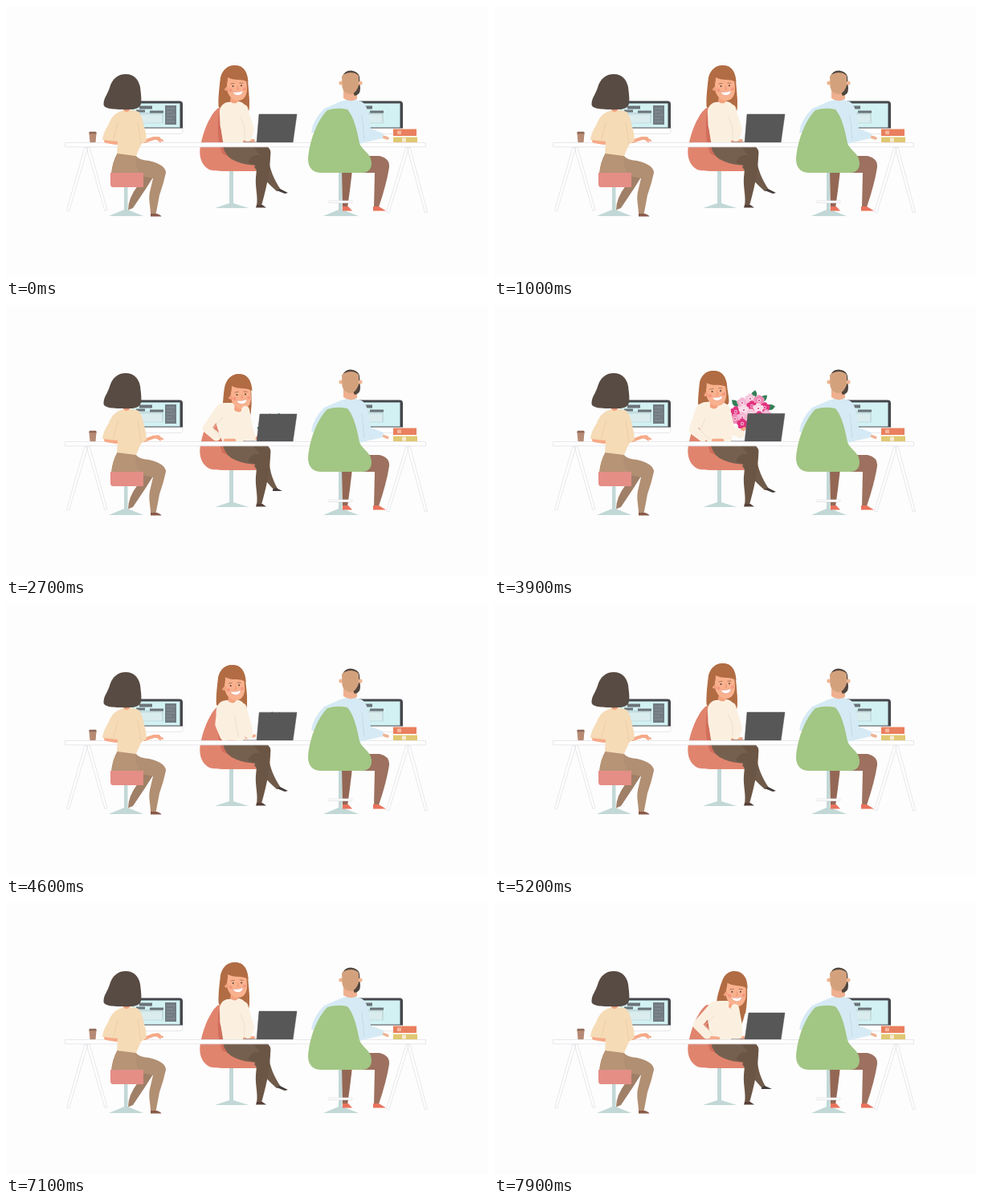
Write an HTML page that moves like this. It is 600x338 px and loops after 8000 ms.

```html
<!DOCTYPE html>
<html lang="en">
<head>
<meta charset="utf-8">
<title>Office desk</title>
<style>
html, body { margin: 0; width: 100%; height: 100%; overflow: hidden; background: #fdfdfd; }
svg { display: block; width: 100vw; height: 100vh; }
.limb { fill: none; stroke-linecap: round; stroke-linejoin: round; }
.cream { stroke: #fbf0e0; }
.skin { stroke: #f6a988; }
.steel { fill: #c2d8d7; }
.white { fill: #fff; stroke: #e3e3e8; stroke-width: .8; }
</style>
</head>
<body>
<svg viewBox="0 0 600 338">
  <defs>
    <g id="screen">
      <path class="white" d="M0 32H63V38Q63 41 59 41H0Z"/>
      <path fill="#45474c" d="M0 0H59Q63 0 63 4V34H0Z"/>
      <path fill="#d2f1f2" d="M0 3H59.500V33H0Z"/>
      <path fill="#c3dcdf" d="M8 14H39V28H8Z"/>
      <path fill="#dbecee" d="M10 17H37V27H10Z"/>
      <path fill="#6b7278" d="M9 6H25V10H9ZM22 12H39V15H22ZM5 11H16V14H5Z"/>
    </g>
    <g id="bloom">
      <circle cx="0" cy="-3.600" r="3.200"/>
      <circle cx="3.400" cy="-1.100" r="3.200"/><circle cx="-3.400" cy="-1.100" r="3.200"/>
      <circle cx="2.100" cy="2.900" r="3.200"/><circle cx="-2.100" cy="2.900" r="3.200"/>
      <circle r="2.200" fill="#fff" opacity=".6"/>
      <circle r="1.100" fill="#cf3c80"/>
    </g>
    <clipPath id="aboveDesk"><path d="M240 60H420V171H240Z"/></clipPath>
  </defs>

  <!-- monitors -->
  <use href="#screen" x="157" y="118.500"/>
  <path fill="#727b82" d="M198 124H212V148H198Z"/>
  <path stroke="#929da4" stroke-width=".7" d="M200 128H210M200 132H208M200 136H210M200 140H207M200 144H210"/>
  <use href="#screen" x="431" y="118.500"/>

  <!-- middle chair -->
  <path class="steel" d="M278 205H283V246L302 252H260L278 246Z"/>
  <path fill="#e1846e" d="M265 127C257 131 247 151 243 170C239 185 242 198 253 204C258 206 264 206 270 206H313Q318 205 314 198L285 188L275 128Z"/>
  <path fill="#d06f5c" d="M266 130C262 147 263 169 269 184L282 190L276 130Z"/>

  <g clip-path="url(#aboveDesk)"><g id="bouquet"></g></g>
  <path id="hair" fill="#b16c43"/>

  <!-- crossed legs -->
  <path id="farLeg" fill="#705b4a"/>
  <path id="farShoe" fill="#453c3a"/>
  <path fill="#75604f" d="M270 175H324Q331 178 329 187L312 199Q296 198 287 194Q273 189 270 175Z"/>
  <path fill="#6b5544" d="M307 175H325Q330 178 329 190C328 211 323 231 318 249H312C314 238 310 226 311 214Q312 206 312 199Q306 197 301 195Q306 184 316 186Q310 178 307 175Z"/>
  <path fill="#574039" d="M312 248H319L324 251.500H311Z"/>

  <path id="torso" fill="#fbf0e0"/>
  <path id="lock" fill="#b16c43"/>
  <g id="head">
    <path fill="#f3a27f" d="M280 111H289V119Q285 124 279 119Z"/>
    <path fill="#f9b18e" d="M275 87Q287 84 299 90L300 103C300 113 295 118 289 118C281 118 275 110 275 102Z"/>
    <circle cx="274.500" cy="103" r="2.600" fill="#f3a27f"/>
    <path fill="#b16c43" d="M270 103C267 85 273 74 285 74C296 74 301 83 301.500 95Q296 92 290 92Q281 92 276 89Q276 97 273 103Z"/>
    <g fill="#f28a79" opacity=".65"><circle cx="279.500" cy="105" r="2.200"/><circle cx="297" cy="103.500" r="2"/></g>
    <g fill="#51413c"><circle cx="282.500" cy="100" r="1"/><circle cx="293" cy="99.300" r="1"/></g>
    <path class="limb" stroke="#9d6545" stroke-width=".8" d="M280 97L284 96.300M291 96L295 96.200"/>
    <path class="limb" stroke="#e78c6d" stroke-width=".8" d="M288.500 100L289.500 104H287.500"/>
    <path fill="#fff" stroke="#d98170" stroke-width=".4" d="M282 107Q289 108.500 295 105.500Q294.500 111 289 111.500Q284 111.500 282 107Z"/>
  </g>
  <path id="rightHand" class="limb skin" stroke-width="4"/>
  <path id="rightArm" class="limb cream" stroke-width="10"/>
  <path id="leftHand" class="limb skin" stroke-width="4.500"/>
  <path id="leftArm" class="limb cream" stroke-width="11"/>
  <path id="fold" class="limb" stroke="#e6d8c6" stroke-width=".7"/>

  <path fill="#77777b" d="M295 169.500H357V171H295Z"/>
  <path id="laptop" fill="#575758" stroke="#4a4a4b" stroke-width=".5"/>

  <!-- cup and books -->
  <path fill="#b78a74" d="M103.500 159H112.500L111.500 170.500H104.500Z"/>
  <path fill="#8f6a59" d="M104 156.800H112L113 159.300H103Z"/>
  <path fill="#e97f5e" d="M482 153.500H511V162H482Z"/>
  <path fill="#f3b79d" d="M487 155.500H492V160H487Z"/>
  <path fill="#fff" d="M481 162H512V163.500H481Z"/>
  <path fill="#e0c872" d="M482 163.500H512V170.500H482Z"/>
  <path fill="#f5ead0" d="M493 164.500H498V169.500H493Z"/>

  <!-- desk -->
  <g class="white">
    <path d="M98 176L75.500 255L78.500 256L102 176ZM100 176L123 255.500L126 254.500L104 176Z"/>
    <path d="M498 176L473.500 257L476.500 258L502 176ZM499 176L521.500 258L524.500 257L503 176Z"/>
    <path d="M73.500 170.500H522.500V175.800H73.500Z"/>
  </g>

  <!-- woman on the left -->
  <path class="steel" d="M147 225H151.500V254L171 262H128L147 254Z"/>
  <path fill="#a07f67" d="M168 209H186L174 228L158 252L152 254.500Q152 240 164 224Z"/>
  <path fill="#b18f72" d="M139 183L162 187Q165 192 178 193Q199 198 199 208Q196 222 191 236L186.500 260H180C180 250 177 242 179 232L183 215Q174 212 165 213L131 211Q132 195 139 183Z"/>
  <path fill="#b69475" d="M139 183L162 187Q159 202 170 211H131Q132 195 139 183Z"/>
  <path fill="#8a5948" d="M180 259H187Q192 260 193.500 262.500H180Z"/>
  <path fill="#e48e86" d="M130 208H171V226H133Q130 226 130 222Z"/>
  <g id="typistHand">
    <path class="limb skin" stroke-width="4" d="M172 169L184 165L190 165"/>
    <path class="limb skin" stroke-width="2.200" d="M188 164L195 168M187 165L192 169"/>
  </g>
  <path class="limb skin" stroke-width="6" d="M125 168L137 170"/>
  <path fill="#f5dbb6" d="M141 132C148 129 159 129 165 132C170 137 171 148 174 158L175 168L168 173L162 187L138 184L139 169L120 167Q121 158 127 149Q132 135 141 132Z"/>
  <path class="limb" stroke="#e7c9a2" stroke-width=".7" d="M139 146L134 166M164 145L168 171"/>
  <path fill="#f2a17f" d="M146 125H154V130Q150 134 146 130Z"/>
  <path fill="#574b43" d="M149 85C160 85 165 92 167 101C168 110 169 116 168 122C166 129.500 156 129.500 145 129C132 129 121 128 121.500 122C122 114 126 111 129 102C132 91 139 85 149 85Z"/>

  <!-- man on the right -->
  <path class="steel" d="M414 206H418.500V254L439 262H395L414 254Z"/>
  <path fill="#946755" d="M418 205H431L428 230L425 252H419Z"/>
  <path fill="#9d705f" d="M443 187H465Q478 190 477 201Q474 221 464 251H458L459 208H444Z"/>
  <path fill="#e9725c" d="M419 250H426L431 255.500H419ZM457 250H464L473 255.500H457Z"/>
  <path class="white" d="M402 243H431V245.500H402Z"/>
  <g id="manHand">
    <path class="limb" stroke="#f0b292" stroke-width="3.500" d="M469 163L475 165"/>
  </g>
  <path fill="#d5eaf4" d="M412 121Q428 113 442 119C450 122 452 137 454 153L470 159L469 165L452 169L440 172L392 159L380 158Q382 142 396 128Z"/>
  <path class="limb" stroke="#b9d4e0" stroke-width=".7" d="M443 136L446 166"/>
  <path fill="#a2c684" d="M400 130Q412 126 425 129C433 138 437 155 440 171C444 181 455 184 455 196Q455 207 444 208H391Q377 207 376 192C377 170 387 143 400 130Z"/>
  <path fill="#efb08f" d="M420 102H437V116Q428 121 420 115Z"/>
  <path fill="#51463f" d="M419 88Q421 80.500 429 80.500Q438 81 440 88L441 103Q441 111 434 112Q431 109 434 100V86H419Z"/>
  <g fill="#efb693"><circle cx="417" cy="96" r="2.600"/><circle cx="441" cy="96" r="2.600"/></g>
  <path fill="#d3a27d" d="M418 87.500Q422 83 430 83Q437 83.500 439 87.500L439 99Q436 109 429 110Q420 109 418.500 101Z"/>
</svg>
<script>
const LOOP = 8000, CYCLE = 6000;
const el = id => document.getElementById(id);

const upright = {
  head: 'translate(0 0) rotate(0 285 98)',
  hair: 'M285 74C296 74 300 83 301 93C302 106 304 119 302 131L290 134L270 128C267 128 265 127 264.500 125C264 112 266 98 267 89C270 78 277 74 285 74Z',
  lock: 'M298 95C302 106 304 121 302 132C299 134 298 130 298 123Z',
  torso: 'M276 120C269 121 265 127 266 136C267 150 269 164 271 174L301 174C303 160 303 140 299 126C296 120 290 118 285 119Z',
  leftArm: 'M272 130L272 148L276 165',
  leftHand: 'M277 173L286 173',
  rightArm: 'M296 128L304 155L301 164',
  rightHand: 'M297 169L308 168',
  fold: 'M292 138L297 152L297 165',
  farLeg: 'M314 192L327 190C328 204 334 217 342 229L337 231C329 224 316 211 309 201Z',
  farShoe: 'M337 230L341 228L351 233L347 234Z',
  laptop: 'M315 135L362 135L357 171L312 171Z',
  bouquet: 'translate(337 157) rotate(-25) scale(.5)'
};
const lean = {
  head: 'translate(14 11) rotate(3 285 98)',
  hair: 'M299 86C310 86 314 95 315 104C315.500 116 315 127 313 138L302 138L286 126C281 127 278 126 277 124C278 114 281 106 284 97C287 89 292 86 299 86Z',
  lock: 'M311 104C316 112 315 138 307 154C302 154 303 138 305 120Z',
  torso: 'M281 122C272 122 266 127 265 134C266 150 269 164 271 174L303 174C309 165 306 140 303 128C300 123 292 122 289 122Z',
  leftArm: 'M274 128L253 152L265 164',
  leftHand: 'M268 168L279 169',
  rightArm: 'M300 131L304 153L304 165',
  rightHand: 'M304 168L311 168',
  fold: 'M275 140L263 152L272 164',
  farLeg: 'M314 192L328 188C327 204 331 216 338 229L333 230C327 223 316 211 309 201Z',
  farShoe: 'M333 230L337 228L346 232L333 232Z',
  laptop: 'M317 137L362 137L357 171L312 171Z',
  bouquet: 'translate(337 157) rotate(-25) scale(.5)'
};
const reach = {
  ...upright,
  head: 'translate(5 12) rotate(0 285 98)',
  hair: 'M290 86C301 86 304 95 305 105C306 115 306 126 304 138L295 138L276 126C272 126 270 124 270 122C271 112 271 106 273 99C276 91 282 86 290 86Z',
  lock: 'M302 107C306 114 306 128 304 138C300 139 299 132 300 124Z',
  torso: 'M272 122C265 122 260 129 259 138C262 150 266 164 271 174L299 174C302 165 303 140 300 128C296 122 288 121 283 122Z',
  leftArm: 'M267 129L250 154L262 164',
  leftHand: 'M273 169L284 169',
  rightArm: 'M298 131L303 156L306 165',
  rightHand: 'M306 166L313 166',
  fold: 'M270 140L258 154L268 166',
  farLeg: lean.farLeg,
  farShoe: 'M332 230L336 228L344 232L332 232Z',
  laptop: 'M316 136L362 136L357 171L312 171Z',
  bouquet: 'translate(332 154) rotate(-25) scale(.75)'
};
const hold = {
  ...upright,
  head: 'translate(-11 8) rotate(-2 285 98)',
  hair: 'M273 82C285 82 289 91 290 101C291 109 293 116 292 123L280 132L259 128C256 128 254 127 254 125C254 114 255 106 256 96C259 86 265 82 273 82Z',
  lock: 'M287 103C291 110 293 116 292 123C289 125 287 122 286 117Z',
  torso: 'M264 121C256 121 250 128 249 138C253 152 262 164 268 174L296 174C297 160 297 140 293 128C289 121 281 119 274 120Z',
  leftArm: 'M257 129L248 156L260 165',
  leftHand: 'M273 169L284 169',
  rightArm: 'M289 130L295 156L307 161',
  rightHand: 'M306 158L312 154',
  fold: 'M263 141L257 156L268 167',
  laptop: 'M316 135.5L362 135.5L357 171L312 171Z',
  bouquet: 'translate(319 131) rotate(0) scale(1)'
};

const steps = [
  [0, upright], [1050, upright], [1900, lean], [2300, lean],
  [2700, reach], [3300, hold], [4100, hold], [4850, upright], [CYCLE, upright]
];

// x, y, colour
const blooms = [
  [-10, -9, '#f5b6d3'], [0, -14, '#f7c9dd'], [11, -12, '#f18ab6'], [18, -3, '#e2337f'],
  [-18, 2, '#e2337f'], [2, -5, '#e2337f'], [10, -2, '#f9dce8'], [-8, 0, '#f9dce8'],
  [20, 6, '#f5b6d3'], [-19, 11, '#f18ab6'], [-10, 9, '#f5b6d3'], [1, 5, '#f7c9dd'],
  [11, 8, '#e2337f'], [-10, 17, '#e2337f'], [2, 15, '#f5b6d3']
];
// x, y, angle
const leaves = [[4, -17, 10], [15, -13, 40], [-17, -7, -55], [23, -3, 70]];

el('bouquet').innerHTML =
  leaves.map(([x, y, a]) =>
    `<path fill="#347f56" transform="translate(${x} ${y}) rotate(${a})" d="M0 4Q-7 -2 1 -8Q7 -2 0 4Z"/>`).join('') +
  blooms.map(([x, y, c]) => `<use href="#bloom" x="${x}" y="${y}" fill="${c}"/>`).join('');

const number = /-?\d*\.?\d+/g;
function mix(a, b, k) {
  const ends = b.match(number);
  let i = 0;
  return a.replace(number, v => (+v + (ends[i++] - v) * k).toFixed(2));
}
const ease = k => k * k * (3 - 2 * k);

function draw(time) {
  const t = time % CYCLE;
  const i = steps.findIndex(s => s[0] > t);
  const [t0, from] = steps[i - 1], [t1, to] = steps[i];
  const k = ease((t - t0) / (t1 - t0));
  for (const id in from) {
    const attr = id === 'head' || id === 'bouquet' ? 'transform' : 'd';
    el(id).setAttribute(attr, mix(from[id], to[id], k));
  }
  const tap = Math.sin(time * Math.PI / 200);
  el('typistHand').setAttribute('transform', `rotate(${tap * 2} 174 168)`);
  el('manHand').setAttribute('transform', `rotate(${-tap * 4} 469 163)`);
}

function tick() {
  draw(performance.now() % LOOP);
  requestAnimationFrame(tick);
}
tick();
</script>
</body>
</html>
```
